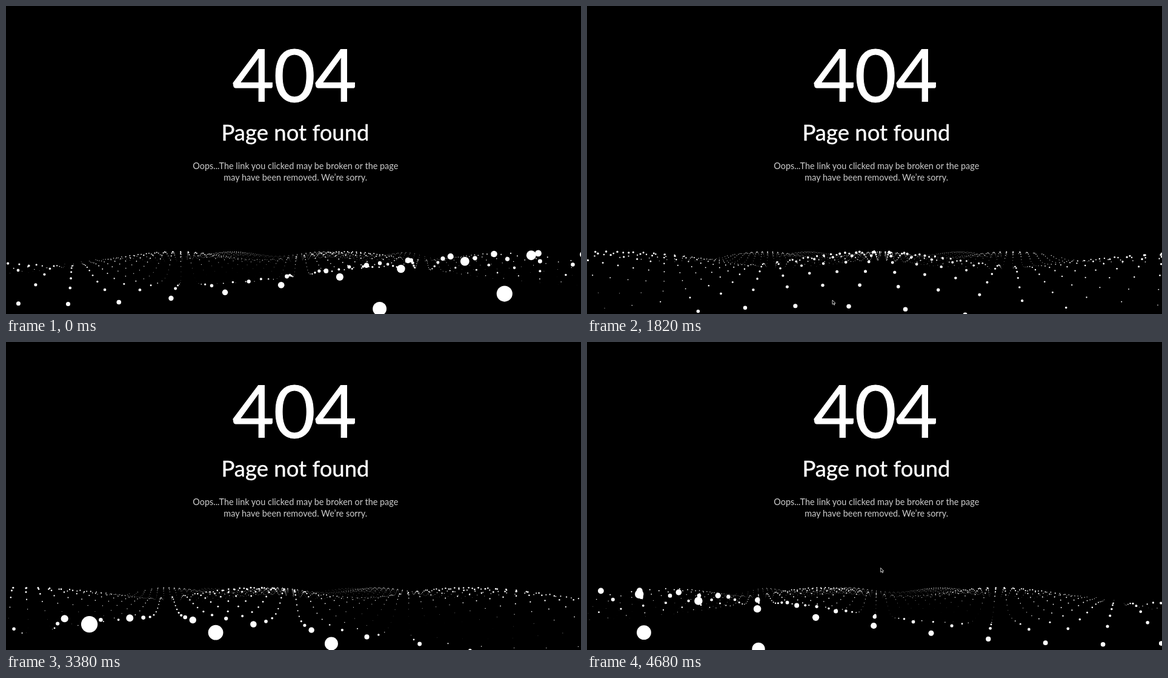
Animation of 949 by 508 pixels, one loop 4810 ms. Source, as an HTML page with a canvas:

```html
<!DOCTYPE html>
<html lang="en">
<head>
<meta charset="utf-8">
<title>404</title>
<style>
  html, body { margin: 0; width: 100%; height: 100%; overflow: hidden; background: #000; }
  canvas, svg { position: absolute; left: 0; top: 0; }
  text { font-family: Lato, "Open Sans", sans-serif; fill: #fff; text-anchor: middle; }
  .code { font-size: 119.5px; letter-spacing: -1.3px; stroke: #fff; stroke-width: 1px; }
  .title { font-size: 36.5px; stroke: #fff; stroke-width: .4px; }
  .note { font-size: 14.45px; fill: #ccc; }
</style>
</head>
<body>
<canvas id="stage" width="949" height="508"></canvas>
<svg width="949" height="508" viewBox="0 0 949 508">
  <text class="code" x="475.5" y="158">404</text>
  <text class="title" x="477.5" y="221.5">Page not found</text>
  <text class="note" x="477.8" y="268.5">Oops...The link you clicked may be broken or the page</text>
  <text class="note" x="477.8" y="287.5">may have been removed. We’re sorry.</text>
  <path id="cursor" d="M0 0V7.2L1.7 5.7L2.8 8.2L4 7.7L2.9 5.3H5Z" fill="#000" stroke="#ddd" stroke-width=".9"/>
</svg>
<script>
const STEP = 130, STEPS = 37;
const GRID = 50, GAP = 100;
const CAM_Y = 97.8, CAM_Z = 1000;
const CENTER_X = 477, CENTER_Y = 424.5;
const FOCAL = 150 / Math.tan(37.5 * Math.PI / 180);

// [step, wave phase, camera x]
const WAVE = [
  [0, -4.7, 30], [5, -2.3, 117], [9, -0.65, 137], [14, 1.2, 61],
  [18, 2.43, -46], [22, 3.55, -81], [26, 4.66, -36], [32, 6.32, 1], [36, 7.6, 5]
];
// [step, x, y] of each pointer visit
const VISITS = [
  [[3, 627, 512], [5, 628.5, 489.5], [9, 624, 488], [14, 405, 485], [17, 330, 512]],
  [[30, 494, 510], [31, 484.7, 372.5], [36, 484.7, 372.5]]
];

const ctx = document.getElementById('stage').getContext('2d');
const cursor = document.getElementById('cursor');

function segment(keys, step) {
  let i = 0;
  while (i < keys.length - 2 && step >= keys[i + 1][0]) i++;
  return i;
}

function linear(keys, step, col) {
  const i = segment(keys, step), a = keys[i], b = keys[i + 1];
  return a[col] + (b[col] - a[col]) * (step - a[0]) / (b[0] - a[0]);
}

function smooth(keys, step, col) {
  const i = segment(keys, step), a = keys[i], b = keys[i + 1];
  const slope = k => {
    const p = keys[Math.max(k - 1, 0)], q = keys[Math.min(k + 1, keys.length - 1)];
    return (q[col] - p[col]) / (q[0] - p[0]);
  };
  const span = b[0] - a[0], u = (step - a[0]) / span, v = 1 - u;
  return v * v * (1 + 2 * u) * a[col] + u * u * (1 + 2 * v) * b[col]
    + span * u * v * (v * slope(i) - u * slope(i + 1));
}

function drawWaves(phase, camX) {
  // The camera always looks at the middle of the grid.
  const flat = Math.hypot(camX, CAM_Z), dist = Math.hypot(flat, CAM_Y);
  const sinYaw = camX / flat, cosYaw = CAM_Z / flat;
  const sinPitch = CAM_Y / dist, cosPitch = flat / dist;
  ctx.fillStyle = '#000';
  ctx.fillRect(0, 0, 949, 508);
  ctx.fillStyle = '#fff';
  for (let ix = 0; ix < GRID; ix++) {
    for (let iy = 0; iy < GRID; iy++) {
      const swell = Math.sin((ix + phase) * 0.3) + Math.sin((iy + phase) * 0.5);
      const dx = (ix - GRID / 2) * GAP - camX;
      const dz = CAM_Z - (iy - GRID / 2) * GAP;
      const drop = CAM_Y - swell * 50;
      const right = dx * cosYaw + dz * sinYaw;
      const ahead = dz * cosYaw - dx * sinYaw;
      const depth = ahead * cosPitch + drop * sinPitch;
      if (depth < 1) continue;
      const zoom = FOCAL / depth;
      ctx.beginPath();
      ctx.arc(CENTER_X + right * zoom,
        CENTER_Y + (drop * cosPitch - ahead * sinPitch) * zoom,
        (swell + 2) * 2 * zoom, 0, 7);
      ctx.fill();
    }
  }
}

function drawCursor(step) {
  const visit = VISITS.find(v => step >= v[0][0] && step <= v[v.length - 1][0]);
  cursor.style.display = visit ? '' : 'none';
  if (visit) cursor.setAttribute('transform',
    `translate(${linear(visit, step, 1)} ${linear(visit, step, 2)})`);
}

let start, shown = -1;
function frame(now) {
  start ??= now;
  const step = Math.floor((now - start) / STEP) % STEPS;
  if (step !== shown) {
    drawWaves(smooth(WAVE, step, 1), smooth(WAVE, step, 2));
    drawCursor(step);
    shown = step;
  }
  requestAnimationFrame(frame);
}
requestAnimationFrame(frame);
</script>
</body>
</html>
```
